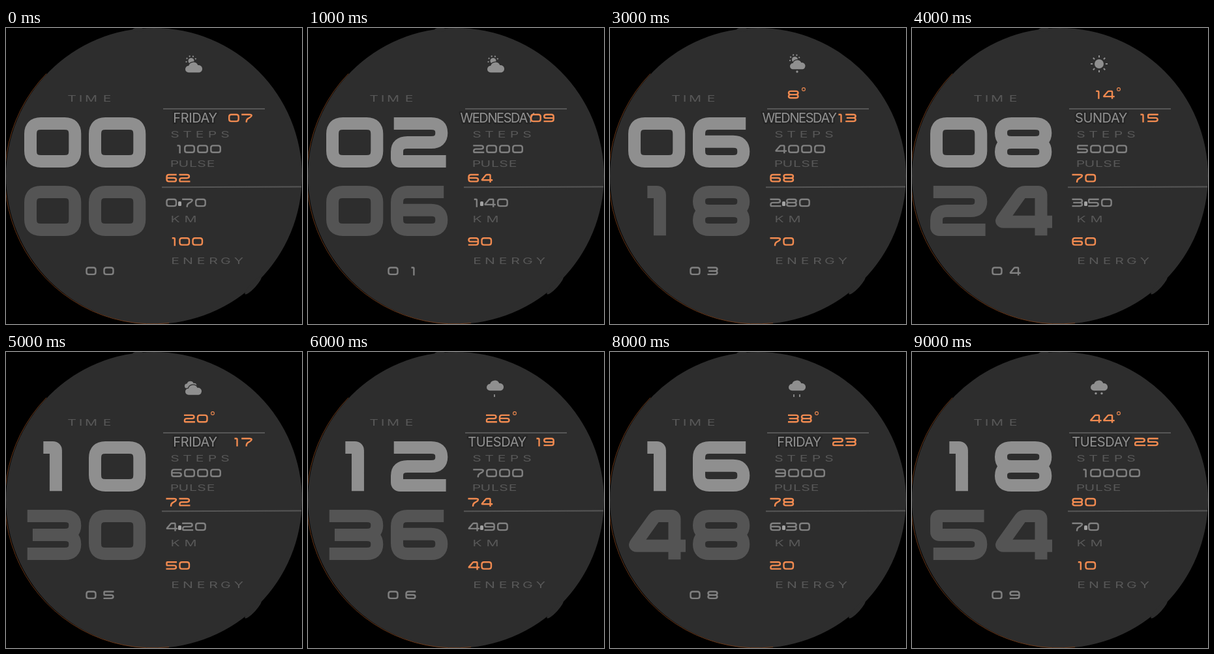
An HTML page for the animation above (10 s loop, 454 px wide and 454 px high).

```html
<!DOCTYPE html>
<html lang="en">
<head>
<meta charset="utf-8">
<title>Watch face</title>
<style>
  html, body { margin: 0; width: 100%; height: 100%; overflow: hidden; background: #000; }
  svg { display: block; width: 100vw; height: 100vh; }
  text { font-family: Inter, sans-serif; text-anchor: middle; }
  .label { font-size: 13.2px; font-weight: 400; fill: #585858; }
  #day { font-size: 20px; fill: #929292; stroke: #262626; stroke-width: 5px; stroke-linejoin: round; paint-order: stroke; }
</style>
</head>
<body>
<svg viewBox="0 0 454 454">
  <g fill="#2d2d2d">
    <circle cx="227" cy="227" r="227"/>
    <ellipse cx="203" cy="2.5" rx="9" ry="3"/>
    <ellipse cx="379" cy="395" rx="18" ry="4" transform="rotate(-47 379 395)"/>
  </g>
  <path d="M62 70A226.5 226.5 0 0 0 250 452.5" fill="none" stroke="#84451f" stroke-opacity=".8"/>
  <path d="M241 124H397M239 244.2L453 243.6" stroke="#565656" stroke-width="2"/>
  <g id="labels"></g>
  <g id="weather"></g>
  <text id="day" x="290" y="145"></text>
  <g id="digits" fill="none"></g>
</svg>
<script>
const GREY = '#8f8f8f', DIM = '#545454', MID = '#808080', ORANGE = '#f08a50', BACK = '#2d2d2d';
const $ = id => document.getElementById(id);

// Centre lines in a unit box; "!" marks a tight corner, "|" starts a new stroke.
const GLYPHS = [
  '0,.5 0,0 1,0 1,1 0,1 0,.5',
  '.29,0 .57,0! .57,1.15',
  '-.07,0 1,0 1,.5 0,.5 0,1! 1.1,1',
  '-.07,0 1,0 1,.5 .2,.5|.05,.5 1,.5 1,1 -.07,1',
  '1.15,.79 -.01,.79! .47,0! .9,0! .9,1.15',
  '1.07,0 0,0! 0,.5! 1,.5 1,1 -.07,1',
  '1.05,0 0,0 0,1 1,1 1,.48 0,.48',
  '-.07,0 1,0 1,.3 .45,.72 .45,1.15',
  '0,.25 0,0 1,0 1,.5 0,.5 0,.25|0,.75 0,.5 1,.5 1,1 0,1 0,.75',
  '-.05,1 1,1 1,0 0,0 0,.52 1,.52'
];
const BIG = { w: 68.3, h: 58, pitch: 99, line: 19, r: 16, shift: 0 };
const SMALL = { w: 14.5, h: 10.4, pitch: 20, line: 2.4, r: 3.4, shift: .28 };
const SECOND = { ...SMALL, w: 14, pitch: 27 };

function stroke(code, x, y, f, shift) {
  const pts = code.split(' ').map(p => {
    const [a, b] = p.split(',').map(parseFloat);
    return { x: x + (a + shift) * f.w, y: y + b * f.h, r: p.endsWith('!') ? f.r * .3 : f.r };
  });
  const last = pts.length - 1;
  const toward = (p, q, isEnd) => {
    const len = Math.hypot(q.x - p.x, q.y - p.y);
    const k = Math.min(p.r, len * (isEnd ? 1 : .5)) / len;
    return `${p.x + (q.x - p.x) * k} ${p.y + (q.y - p.y) * k}`;
  };
  let d = `M${pts[0].x} ${pts[0].y}`;
  for (let i = 1; i < last; i++) {
    const p = pts[i];
    d += `L${toward(p, pts[i - 1], i === 1)}Q${p.x} ${p.y} ${toward(p, pts[i + 1], i === last - 1)}`;
  }
  return d + `L${pts[last].x} ${pts[last].y}`;
}

// x, y: top left of the first digit's outer box
function number(value, x, y, color, f = SMALL) {
  const d = [...String(value)].map((c, i) =>
    GLYPHS[c].split('|').map(s => stroke(s, x + i * f.pitch + f.line / 2, y + f.line / 2, f, c === '1' ? f.shift : 0)).join('')
  ).join('');
  return `<path d="${d}" stroke="${color}" stroke-width="${f.line}"/>`;
}

function label(word, y, centers) {
  const wide = 1.6;
  const xs = centers.map(c => c / wide).join(' ');
  return `<text class="label" transform="scale(${wide} 1)" x="${xs}" y="${y}">${word}</text>`;
}

const cloud = (x, y, s, edge = 0) =>
  `<path transform="translate(${x} ${y}) scale(${s})" d="M5 15a5 5 0 0 1 0-10a7.5 7.5 0 0 1 14-1a5.5 5.5 0 0 1 2 11z"
    fill="${GREY}" stroke="${BACK}" stroke-width="${edge}" paint-order="stroke"/>`;

const dot = (x, y, r) => `<circle cx="${x}" cy="${y}" r="${r}" fill="${GREY}"/>`;

function rays(x, y, from, to, count, first, step) {
  let d = '';
  for (let i = 0; i < count; i++) {
    const a = (first + i * step) * Math.PI / 180, c = Math.cos(a), s = Math.sin(a);
    d += `M${x + c * from} ${y + s * from}L${x + c * to} ${y + s * to}`;
  }
  return `<path d="${d}" stroke="${GREY}" stroke-width="2"/>`;
}

const halfSun = (x, y, r) => dot(x, y, r) + rays(x, y, r + 2, r + 4, 5, 170, 41);
const drops = xs => xs.map(x => `<path d="M${x} 65V69" stroke="${GREY}" stroke-width="1.8"/>`).join('');
const flakes = (xs, y) => xs.map(x => dot(x, y, 1.7)).join('');
const smallSunCloud = () => halfSun(283.5, 48.5, 4.5) + cloud(276, 49.5, .92, 2.5);
const plainCloud = () => cloud(274, 44, 1.02);

const SKY = [
  () => halfSun(284, 50.5, 4.5) + cloud(275, 53, 1.02, 2.5),
  () => smallSunCloud() + drops([282, 287.5, 293]),
  () => smallSunCloud() + flakes([287], 67),
  () => dot(287, 55, 7) + rays(287, 55, 9.8, 13, 8, 0, 45),
  () => cloud(274, 45, .72) + cloud(275, 51, .98, 2.5),
  () => plainCloud() + drops([286]),
  () => plainCloud() + flakes([286], 64),
  () => plainCloud() + drops([282, 291]),
  () => plainCloud() + flakes([282, 291], 63.5)
];

const pad = n => String(n).padStart(2, '0');

function temperature(t) {
  if (t < 0) return '';
  const x = 277 + 20 * String(t).length;
  return number(t, 272.8, 95.7, ORANGE) + `<circle cx="${x}" cy="94" r="2.4" stroke="${ORANGE}" stroke-width="1.1"/>`;
}

function distance(km) {
  const [whole, part] = km.toFixed(2).replace('.00', '.0').split('.');
  return number(whole, 245.3, 261.5, MID) + number(part, 270, 261.5, MID) +
    '<rect x="264" y="266" width="5" height="7" rx="1.5" fill="#a2a2a2"/>';
}

function render(k) {
  const date = new Date(2022, k, 7 + 2 * k);
  const day = date.toLocaleDateString('en-US', { weekday: 'long' }).toUpperCase();
  $('day').textContent = day;
  $('day').style.letterSpacing = day.length > 8 ? '-1.4px' : '-.4px';
  $('weather').innerHTML = SKY[Math.max(0, k - 1)]();
  $('digits').innerHTML =
    number(pad(2 * k), 28, 137, GREY, BIG) +
    number(pad(6 * k), 28, 242, DIM, BIG) +
    number(pad(k), 122.3, 366.3, MID, SECOND) +
    number(pad(date.getDate()), 341, 131.5, ORANGE) +
    number(1000 * (k + 1), 253.1, 179.2, MID) +
    number(62 + 2 * k, 245.3, 223.8, ORANGE) +
    number(100 - 10 * k, 245.3, 321, ORANGE) +
    temperature(6 * k - 10) +
    distance(.7 * (k + 1));
}

$('labels').innerHTML =
  label('TIME', 112.7, [101, 114.5, 130.5, 155]) +
  label('STEPS', 167.6, [259, 278, 297, 316.5, 336]) +
  label('PULSE', 212.8, [258.5, 272.5, 287, 300, 314]) +
  label('KM', 297.8, [259.5, 283]) +
  label('ENERGY', 362.5, [259.5, 279, 299, 318, 337, 357]);

let shown = -1;
function tick() {
  const k = Math.floor(performance.now() % 10000 / 1000);
  if (k !== shown) render(shown = k);
  requestAnimationFrame(tick);
}
tick();
</script>
</body>
</html>
```
